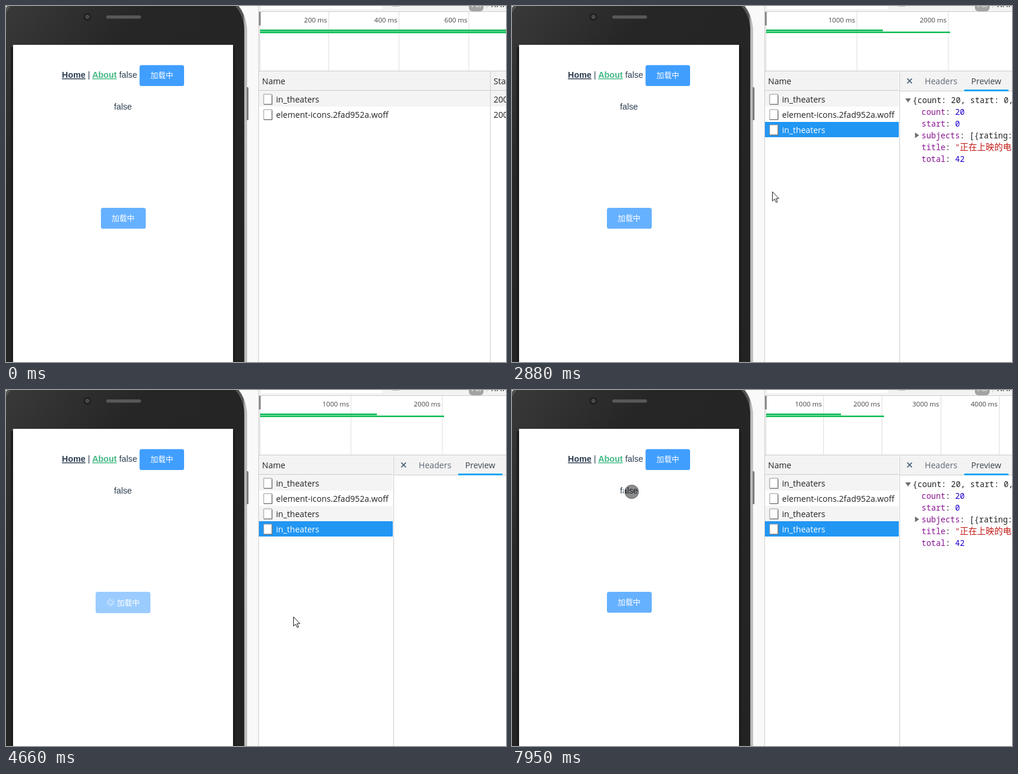
An HTML page for the animation above (8000 ms loop, 848 by 605 pixels).

```html
<!DOCTYPE html>
<html lang="zh">
<head>
<meta charset="utf-8">
<title>Loading button and network panel</title>
<style>
html, body { margin: 0; width: 100%; height: 100%; overflow: hidden; background: #fff; }
svg { display: block; width: 100%; height: 100%; }
text { white-space: pre; }

.app { font: 14.4px "Liberation Sans", Arial, sans-serif; fill: #2c3e50; }
.link { font-weight: bold; text-decoration: underline; }
.cjk { font: 500 12.9px "Noto Sans CJK SC", "Noto Sans CJK", sans-serif; fill: #fff; }
.ui { font: 14.1px "Open Sans", "Noto Sans", sans-serif; fill: #222; }
.tick { font-size: 11.5px; fill: #444; text-anchor: end; }
.grid { stroke: #ddd; fill: none; }
.bar { stroke: #0abb53; stroke-width: 2.6; fill: none; }
.tip { stroke: #1ba8c8; stroke-width: 2.6; fill: none; }
.mono { font: 13.55px "Noto Sans Mono", "DejaVu Sans Mono", "Noto Sans CJK SC", monospace; fill: #222; }
.key { fill: #881391; }
.num { fill: #1c00cf; }
.str { fill: #c41a16; }

/* 8 s timeline: 1% = 80 ms */
.show, .hue { animation: 8s step-end infinite; }
@keyframes idle { 0% { opacity: 1 } 12.5% { opacity: 0 } 28.75% { opacity: 1 } 45.375% { opacity: 0 } 88.5% { opacity: 1 } }
@keyframes busy { 0% { opacity: 0 } 12.5% { opacity: 1 } 28.75% { opacity: 0 } 45.375% { opacity: 1 } 88.5% { opacity: 0 } }
@keyframes press { 0% { fill: #8fc1f7 } 16% { fill: #9bccff } 45% { fill: #7fb5ee } 48% { fill: #9bccff } }
@keyframes tap { 0% { opacity: 0 } 12.5% { opacity: 1 } 16% { opacity: 0 } 45.375% { opacity: 1 } 48% { opacity: 0 } }
@keyframes first { 0% { opacity: 1 } 12.5% { opacity: 0 } }
@keyframes second { 0% { opacity: 0 } 12.5% { opacity: 1 } 28.75% { opacity: 0 } }
@keyframes scaleA { 0% { opacity: 1 } 15.5% { opacity: 0 } }
@keyframes scaleB { 0% { opacity: 0 } 15.5% { opacity: 1 } 28.75% { opacity: 0 } }
@keyframes scaleC { 0% { opacity: 0 } 28.75% { opacity: 1 } 88.5% { opacity: 0 } }
@keyframes scaleD { 0% { opacity: 0 } 88.5% { opacity: 1 } }
@keyframes row3 { 0% { opacity: 0 } 12.5% { opacity: 1 } }
@keyframes row4 { 0% { opacity: 0 } 45.375% { opacity: 1 } }
@keyframes back3 { 0% { fill: #f4f4f4 } 19.8% { fill: #ebf2fa } 28.75% { fill: #2196f3 } 43.75% { fill: #d2d2d2 } 52.75% { fill: #f4f4f4 } }
@keyframes ink3 { 0% { fill: #222 } 28.75% { fill: #fff } 43.75% { fill: #222 } }
@keyframes back4 { 0% { fill: #fff } 50.5% { fill: #ebf2fa } 52.75% { fill: #2196f3 } }
@keyframes ink4 { 0% { fill: #222 } 52.75% { fill: #fff } }
@keyframes hint { 0% { opacity: 0 } 25% { opacity: 1 } 28.75% { opacity: 0 } }
@keyframes panel { 0% { opacity: 0 } 28.75% { opacity: 1 } }
@keyframes json { 0% { opacity: 1 } 52.75% { opacity: 0 } 88.5% { opacity: 1 } }
@keyframes arrow { 0% { opacity: 0 } .875% { opacity: 1 } 2.65% { opacity: 0 } 18.66% { opacity: 1 } 19.8% { opacity: 0 }
  28.8% { opacity: 1 } 38% { opacity: 0 } 48.6% { opacity: 1 } 50.4% { opacity: 0 } 54.2% { opacity: 1 } 95.6% { opacity: 0 } }
@keyframes touch { 0% { opacity: 0 } 2.65% { opacity: 1 } 18.66% { opacity: 0 } 38% { opacity: 1 } 48.6% { opacity: 0 } 95.6% { opacity: 1 } }
@keyframes hand { 0% { opacity: 0 } 19.8% { opacity: 1 } 28.8% { opacity: 0 } 50.4% { opacity: 1 } 54.2% { opacity: 0 } }
@keyframes glow { 0% { opacity: 0 } 26.9% { opacity: 1 } 28.75% { opacity: 0 } 52.2% { opacity: 1 } 53.6% { opacity: 0 } }

.pointer { animation: path 8s linear infinite; }
@keyframes path {
  0%, .875% { transform: translate(441px, 528px) }
  8.75% { transform: translate(192px, 368px) }
  10.5% { transform: translate(190px, 366px) }
  14.5%, 16.25% { transform: translate(214px, 364px) }
  20% { transform: translate(480px, 215px) }
  21.375%, 28.125% { transform: translate(493px, 209px) }
  32%, 33% { transform: translate(457px, 291px) }
  34.125%, 35.875% { transform: translate(445px, 308px) }
  37.5% { transform: translate(400px, 393px) }
  43.75%, 45.375% { transform: translate(203px, 366px) }
  45.5%, 45.8% { transform: translate(252px, 357px) }
  51%, 53.125% { transform: translate(490px, 236px) }
  56.25% { transform: translate(505px, 274px) }
  58.25% { transform: translate(487px, 385px) }
  61.25% { transform: translate(511px, 380px) }
  66% { transform: translate(489px, 385px) }
  69%, 93.375% { transform: translate(495px, 385px) }
  99.25%, 100% { transform: translate(203px, 173px) }
}
.spin { transform-origin: 177.5px 361px; animation: spin 2s linear infinite; }
@keyframes spin { to { transform: rotate(360deg) } }
</style>
</head>
<body>
<svg viewBox="0 0 848 605" preserveAspectRatio="none">
  <defs>
    <linearGradient id="body" x1="0" y1="0" x2=".7" y2="1">
      <stop offset="0" stop-color="#3b3b3b"/><stop offset=".12" stop-color="#333"/>
      <stop offset=".3" stop-color="#262626"/><stop offset="1" stop-color="#232323"/>
    </linearGradient>
    <linearGradient id="rim" gradientUnits="userSpaceOnUse" x1="402" x2="409" y1="0" y2="0">
      <stop offset="0" stop-color="#555"/><stop offset=".35" stop-color="#aaa"/>
      <stop offset=".75" stop-color="#c9c9c9"/><stop offset="1" stop-color="#777"/>
    </linearGradient>
    <pattern id="mesh" width="3" height="3" patternUnits="userSpaceOnUse">
      <rect width="3" height="3" fill="#4a4a4a"/><path d="M0 3L3 0" stroke="#777" stroke-width=".9"/>
    </pattern>
    <filter id="soft" x="-5%" y="-20%" width="110%" height="150%">
      <feDropShadow dx="0" dy="1.5" stdDeviation="1.5" flood-opacity=".25"/>
    </filter>
    <g id="file">
      <rect x="437" y="6.5" width="14" height="17" rx=".8" fill="#fff" stroke="#929292"/>
      <path d="M437 23.7H451.3V8" fill="none" stroke="#6f6f6f" stroke-width="1.1"/>
    </g>
  </defs>

  <!-- phone -->
  <rect width="428" height="605" fill="#f9f9f9"/>
  <rect x="406" y="138" width="5.2" height="56" rx="1.5" fill="#777"/>
  <rect x="-11.5" y="-25" width="420" height="760" rx="65" fill="url(#rim)"/>
  <rect x="-7" y="-21" width="411" height="750" rx="61" fill="url(#body)"/>
  <path d="M10 70V605M387 70V605" stroke="#1d1d1d" stroke-width="4"/>
  <circle cx="138" cy="18.5" r="5.6" fill="#2b2b2b" stroke="#1b1b1b" stroke-width="1.4"/>
  <circle cx="138" cy="18.5" r="2.3" fill="#3c3c3c" stroke="#6d6d6d"/>
  <rect x="169.5" y="15.5" width="60" height="6.5" rx="3.2" fill="url(#mesh)" stroke="#222" stroke-width=".8"/>
  <rect x="12" y="66" width="373" height="540" fill="#fff"/>

  <g class="app">
    <text class="link" x="94.8" y="122">Home</text>
    <text x="138.8" y="122">|</text>
    <text class="link" x="146.2" y="122" fill="#42b983">About</text>
    <text x="192" y="122">false</text>
    <text x="183.2" y="176">false</text>
  </g>
  <rect x="226.5" y="100.5" width="75.5" height="35.5" rx="3.6" fill="#409eff"/>
  <text class="cjk" x="245" y="122.3">加载中</text>

  <g class="show" style="animation-name:idle">
    <rect x="161" y="343" width="76" height="35.5" rx="3.6" fill="#66b1ff"/>
    <text class="cjk" x="179.3" y="365.2">加载中</text>
  </g>
  <g class="show" style="animation-name:busy">
    <rect class="hue" style="animation-name:press" x="152" y="343" width="93" height="36.3" rx="3.6"/>
    <g class="spin" stroke="#fff" stroke-opacity=".8" stroke-width="1.2" stroke-linecap="round">
      <path id="spokes" d="M177.5 355v3M177.5 364v3M171.5 361h3M180.5 361h3"/>
      <use href="#spokes" transform="rotate(45 177.5 361)"/>
    </g>
    <text class="cjk" x="188" y="366">加载中</text>
    <rect class="show" style="animation-name:tap" x="152" y="343" width="93" height="36.3" rx="3.6" fill="#33b5e5" fill-opacity=".4"/>
  </g>

  <!-- network panel -->
  <rect x="428" width="420" height="605" fill="#fff"/>
  <rect x="428" width="420" height="9.5" fill="#f3f3f3"/>
  <rect x="433" width="205" height="5" fill="#fff"/>
  <rect x="655.5" y="-10" width="11" height="10.5" fill="#fff" stroke="#bbb"/>
  <rect x="785" y="-10" width="25" height="19" rx="6" fill="#a3a3a3"/>
  <g class="ui" font-size="13">
    <text x="790" y="2" style="fill:#fff">All</text>
    <text x="823" y="2">XHR</text>
  </g>
  <path d="M815.5 0V4" stroke="#ccc"/>
  <path d="M428 9.5H848" stroke="#ccc"/>
  <path d="M430.5 33V110" stroke="#ccc"/>
  <rect x="428.5" y="10" width="3.5" height="23" fill="#8a8a8a"/>

  <g class="show ui" style="animation-name:scaleA">
    <path class="grid" d="M547.5 10V110M666.5 10V110M785 10V110"/>
    <text class="tick" x="544.5" y="28">200 ms</text>
    <text class="tick" x="663.5" y="28">400 ms</text>
    <text class="tick" x="782.5" y="28">600 ms</text>
  </g>
  <g class="show ui" style="animation-name:scaleB">
    <path class="grid" d="M526.5 10V110M623.5 10V110M719.5 10V110M817.5 10V110"/>
    <text class="tick" x="523.5" y="28">500 ms</text>
    <text class="tick" x="620.5" y="28">1000 ms</text>
    <text class="tick" x="717" y="28">1500 ms</text>
    <text class="tick" x="814.5" y="28">2000 ms</text>
  </g>
  <g class="show ui" style="animation-name:scaleC">
    <path class="grid" d="M585 10V110M740 10V110"/>
    <text class="tick" x="582" y="28">1000 ms</text>
    <text class="tick" x="737" y="28">2000 ms</text>
    <path class="bar" d="M431 41.4H629M431 44.8H743"/>
  </g>
  <g class="show ui" style="animation-name:scaleD">
    <path class="grid" d="M528.5 10V110M627.5 10V110M727.5 10V110M826.5 10V110"/>
    <text class="tick" x="525.5" y="28">1000 ms</text>
    <text class="tick" x="624.5" y="28">2000 ms</text>
    <text class="tick" x="724.5" y="28">3000 ms</text>
    <text class="tick" x="823.5" y="28">4000 ms</text>
    <path class="bar" d="M431 41.4H558M431 44.8H631"/>
  </g>
  <g class="show" style="animation-name:first">
    <rect x="431" y="40" width="417" height="6" fill="#a9e8c2"/>
    <path class="bar" d="M431 41.2H848M431 44.9H848"/>
  </g>
  <g class="show" style="animation-name:second">
    <path class="bar" d="M431 41.4H677M431 44.8H820.5"/>
    <path class="tip" d="M677 41.4h2M820.5 44.8h1.5"/>
  </g>

  <rect x="428" y="110" width="420" height="33.5" fill="#f3f3f3"/>
  <path d="M428 110.5H848M428 143.5H848" stroke="#ccc"/>
  <g class="ui">
    <text x="434.3" y="133">Name</text>
    <text x="827" y="133">Sta</text>
    <rect x="429" y="144" width="419" height="27" fill="#f4f4f4"/>
    <use href="#file" y="143.5"/>
    <text x="458" y="164">in_theaters</text>
    <text x="827" y="164">200</text>
    <use href="#file" y="169.5"/>
    <text x="458" y="190">element-icons.2fad952a.woff</text>
    <text x="827" y="190">200</text>
    <g class="show" style="animation-name:row3">
      <rect class="hue" style="animation-name:back3" x="429" y="197" width="419" height="26"/>
      <use href="#file" y="195.5"/>
      <text class="hue" style="animation-name:ink3" x="458" y="216">in_theaters</text>
      <text x="827" y="216" fill="#888">(pe</text>
    </g>
    <g class="show" style="animation-name:row4">
      <rect class="hue" style="animation-name:back4" x="429" y="223" width="419" height="26"/>
      <use href="#file" y="221.5"/>
      <text class="hue" style="animation-name:ink4" x="458" y="242">in_theaters</text>
    </g>
  </g>
  <path d="M428.5 0V605M821.5 111V605" stroke="#ccc"/>

  <g class="show" style="animation-name:panel">
    <rect x="656" y="111" width="192" height="494" fill="#fff"/>
    <rect x="657" y="111" width="191" height="33" fill="#f3f3f3"/>
    <path d="M657.5 111V605M657 144.5H848" stroke="#ccc"/>
    <path d="M670.3 123.3l8 8m0-8l-8 8" stroke="#46627c" stroke-width="1.7"/>
    <rect x="767" y="142" width="75" height="3" fill="#03a5f2"/>
    <g class="ui">
      <text x="700" y="133" fill="#5a6673">Headers</text>
      <text x="778.8" y="133" fill="#37424d">Preview</text>
    </g>
    <g class="show mono" style="animation-name:json">
      <path d="M667 157h9.6l-4.8 7zM683.5 215v9.6l7-4.8z" fill="#6e6e6e"/>
      <text x="679.5" y="165">{count: 20, start: 0, …}</text>
      <text x="694.5" y="185"><tspan class="key">count</tspan>: <tspan class="num">20</tspan></text>
      <text x="694.5" y="205"><tspan class="key">start</tspan>: <tspan class="num">0</tspan></text>
      <text x="694.5" y="225"><tspan class="key">subjects</tspan>: [{rating:</text>
      <text x="694.5" y="245"><tspan class="key">title</tspan>: <tspan class="str">"<tspan font-size="14.6">正在上映的电影</tspan></tspan></text>
      <text x="694.5" y="265"><tspan class="key">total</tspan>: <tspan class="num">42</tspan></text>
    </g>
  </g>

  <g class="show ui" style="animation-name:hint">
    <rect x="498.5" y="232.5" width="304" height="31.5" rx="1" fill="#f2f2f2" stroke="#bdbdbd" filter="url(#soft)"/>
    <text x="509.3" y="254">http://localhost:8080/v2/movie/in_theaters</text>
  </g>

  <!-- pointer -->
  <g class="pointer">
    <circle class="show" style="animation-name:glow" r="15" fill="#f5f03c" fill-opacity=".75"/>
    <path class="show" style="animation-name:arrow" d="M.5.5V16.3L4.1 12.9 6.8 18.6 9.1 17.6 6.5 12H11.4Z" fill="#fff" stroke="#111"/>
    <path class="show" style="animation-name:hand" d="M-1.6 13V3Q-1.6 1 .2 1T2 3V8.6Q4.9 7.3 5.3 9.5 8 8.4 8.5 10.5 11.5 9.8 11.5 12.5V17Q11 20 9.5 23.5H1.5Q-1 19 -4.6 15.8 -5.8 14 -4.2 13 -2.8 12.6 -1.6 14.2M2 8.6V13M5.3 9.5V13M8.5 10.5V13.5" fill="#fff" stroke="#111" stroke-width="1.1"/>
    <g class="show" style="animation-name:touch">
      <circle r="14" fill="none" stroke="#777" stroke-opacity=".35" stroke-width=".7" stroke-dasharray="4 7"/>
      <circle r="12.8" fill="none" stroke="#fff" stroke-width="2"/>
      <circle r="12" fill="#000" fill-opacity=".45"/>
      <circle r="11.5" fill="none" stroke="#000" stroke-opacity=".25"/>
    </g>
  </g>
</svg>
</body>
</html>
```
